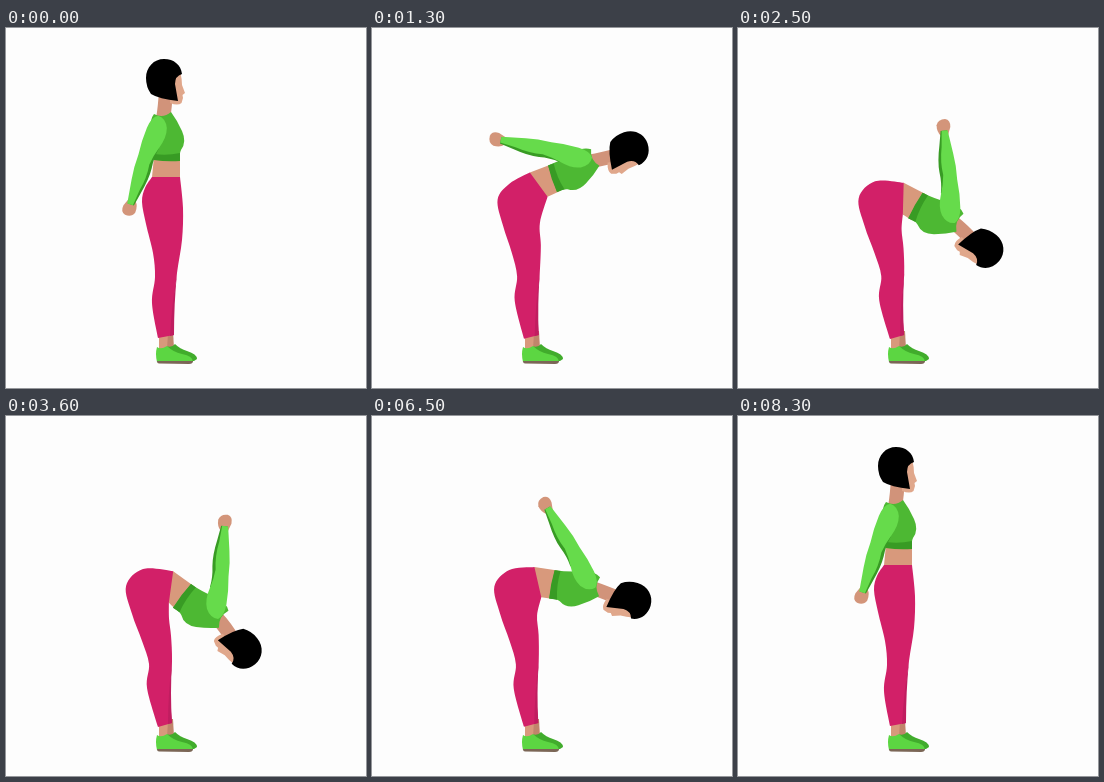
Write an HTML page that moves like this. It is 360 by 360 pixels and loops after 8400 ms.

```html
<!DOCTYPE html>
<html lang="en">
<head>
<meta charset="utf-8">
<title>Forward bend stretch</title>
<style>
html, body { margin: 0; width: 100%; height: 100%; overflow: hidden; background: #fdfdfd; }
svg { display: block; width: 100vw; height: 100vh; }
</style>
</head>
<body>
<svg viewBox="0 0 360 360">
  <g id="feet">
    <path d="M161 303L167 303L168 320L160 321Z" fill="#c0856b"/>
    <path d="M160 318Q166 320 169 316Q174 321 181 323Q191 326 191 331L188 333L162 333Z" fill="#41ac2c"/>
    <path d="M153 306L162 304L161 322L153 322Z" fill="#d8997c"/>
    <path d="M151 319Q155 322 161 318Q167 324 176 326Q187 328 187 334L151 334Q149 326 151 319Z" fill="#5cd642"/>
    <path d="M151 333L187 333Q187 336 183 336L153 335.500Q151 335.500 151 333Z" fill="#7b6656"/>
  </g>
  <path id="neck" stroke="#d1937a" stroke-width="14" fill="none"/>
  <path id="waist" fill="#d8997c"/>
  <path id="legs" fill="#d22068"/>
  <path id="farLeg" fill="#c01d60"/>
  <g id="torso">
    <path d="M148 86Q157 91 165 84Q171 92 176 103Q181 114 175 122Q173 126 174 133L148 132Q148 118 145 104Q143 92 148 86Z" fill="#4db833"/>
    <path d="M148 126Q161 128 174 125L174 133Q161 134 148 132Z" fill="#389b24"/>
  </g>
  <g id="arm">
    <path d="M-3.500 81L3.500 81Q7.500 85 7 92Q5 98 -2 97.500Q-7.500 96 -6.500 89Z" fill="#d3957a"/>
    <path d="M-4 70L3 20L9 24Q7 34 8.500 45Q9.500 56 6 72L3.500 86L-3 86Z" fill="#389b24"/>
    <path d="M-2 -7Q-8 -4 -9 8Q-10 22 -8.500 36Q-9 50 -7 62L-3.500 86L2.500 86L4 70Q7 55 5 42Q6 32 9 23Q13 11 10 2Q6 -7 -2 -7Z" fill="#66db4b"/>
  </g>
  <g id="head">
    <path d="M165 44L174.500 45Q176 51 176 57L179 65L176.500 67L177 70L175.500 75Q172 78 164 75Z" fill="#e0a78b"/>
    <path d="M158 31C168 31 175 37 176 46Q169 48 169 56L172 73Q153 71 145 66Q140 59 140 50C140 39 148 31 158 31Z" fill="#000"/>
  </g>
</svg>
<script>
const LOOP = 8400, STEP = 100, RAD = Math.PI / 180, MAX_BEND = 126;
const HIP = [160, 149], SHOULDER = [152, 95], NECK = [157, 85];
const $ = id => document.getElementById(id);
const points = text => text.split(', ').map(p => p.split(' ').map(Number));

// trouser edges below the waist, standing and fully bent
const BACK = [
  points('139 160, 136 174, 140 196, 147 225, 149 249, 146 275, 152 310'),
  points('137 153, 120 170, 126 198, 136 225, 143 248, 141 272, 152 311')
];
const FRONT = [
  points('168 307, 168 275, 171 245, 176 212, 177 180'),
  points('166 307, 164 278, 166 245, 165 220, 163 203')
];

// leaves 0 softly and settles towards 1
const settle = (t, span, power) => 1 - Math.exp(-Math.pow(Math.max(t, 0) / span, power));
const smooth = s => s * s * (3 - 2 * s);

function poseAt(t) {
  const s = Math.min(settle(t, 1467, 1.85), settle(8150 - t, 1330, 2));
  const torso = MAX_BEND * s;
  const lag = 16 * Math.exp(-Math.pow((t - 1400) / 450, 2));
  const sway = Math.sin(Math.PI * Math.sqrt(s));
  return {
    s, torso,
    arm: 18.6 + 1.33 * torso - lag * smooth(s),
    head: torso + 16 * s ** 3,
    hip: [160 + 2 * s + 5.5 * sway, 149 + 22 * smooth(s) ** 2.3 + 2 * sway]
  };
}

const pt = p => p[0].toFixed(2) + ' ' + p[1].toFixed(2);
const mix = ([from, to], k) => from.map((p, i) => p.map((v, j) => v + (to[i][j] - v) * k));

function spline(pts) {
  let d = pt(pts[0]);
  for (let i = 0; i < pts.length - 1; i++) {
    const a = pts[i], b = pts[i + 1], p = pts[i - 1] || a, n = pts[i + 2] || b;
    const c1 = [0, 1].map(k => a[k] + (b[k] - p[k]) / 6);
    const c2 = [0, 1].map(k => b[k] - (n[k] - a[k]) / 6);
    d += `C${pt(c1)} ${pt(c2)} ${pt(b)}`;
  }
  return d;
}

// carries a point of the upright figure along with a turning part
function turn([x, y], angle, [ox, oy], [nx, ny]) {
  const c = Math.cos(angle * RAD), s = Math.sin(angle * RAD);
  x -= ox; y -= oy;
  return [nx + x * c - y * s, ny + x * s + y * c];
}

function place(id, [nx, ny], angle, [ox, oy], extra = '') {
  $(id).setAttribute('transform',
    `translate(${nx} ${ny}) rotate(${angle}) translate(${-ox} ${-oy}) ${extra}`);
}

function draw(t) {
  const { s, torso, arm, head, hip } = poseAt(t);
  const onTorso = p => turn(p, torso, HIP, hip);
  const neck = onTorso(NECK), stretch = 1 + .14 * s;

  // the back widens as it rounds
  place('torso', hip, torso, HIP, `translate(174 0) scale(${stretch} 1) translate(-174 0)`);
  place('arm', onTorso(SHOULDER), arm, [0, 0]);
  place('head', neck, head, NECK);

  const skull = turn([160, 62], head, NECK, neck);
  $('neck').setAttribute('d', `M${pt(onTorso([157, 91]))}Q${pt(onTorso([159, 80]))} ${pt(skull)}`);

  // the waistband tilts less than the torso
  const band = x => turn([x, 0], torso * .78, [0, 0], [hip[0] + 3 * s, hip[1]]);
  const half = 14 + 2 * s, k = s * (1.4 - .4 * s);
  const waist = [band(-half), band(half)];
  const back = [waist[0], ...mix(BACK, k)], front = [...mix(FRONT, k), waist[1]];
  $('legs').setAttribute('d', `M${spline(back)}L${spline(front)}Z`);

  const ribs = [onTorso([174 - 26 * stretch, 129]), onTorso([174, 129])];
  const tuck = turn([0, 8], torso * .78, [0, 0], hip);
  $('waist').setAttribute('d', 'M' + [ribs[0], waist[0], tuck, waist[1], ribs[1]].map(pt).join('L') + 'Z');

  const [ankle, shin, knee] = front;
  $('farLeg').setAttribute('d',
    `M${pt(ankle)}L${pt([ankle[0] - 4, ankle[1] + 1])}Q${pt([shin[0] - 2, shin[1]])} ${pt(knee)}Q${pt(shin)} ${pt(ankle)}Z`);
}

function tick(now) {
  draw(Math.floor(now % LOOP / STEP) * STEP);
  requestAnimationFrame(tick);
}
draw(0);
requestAnimationFrame(tick);
</script>
</body>
</html>
```
